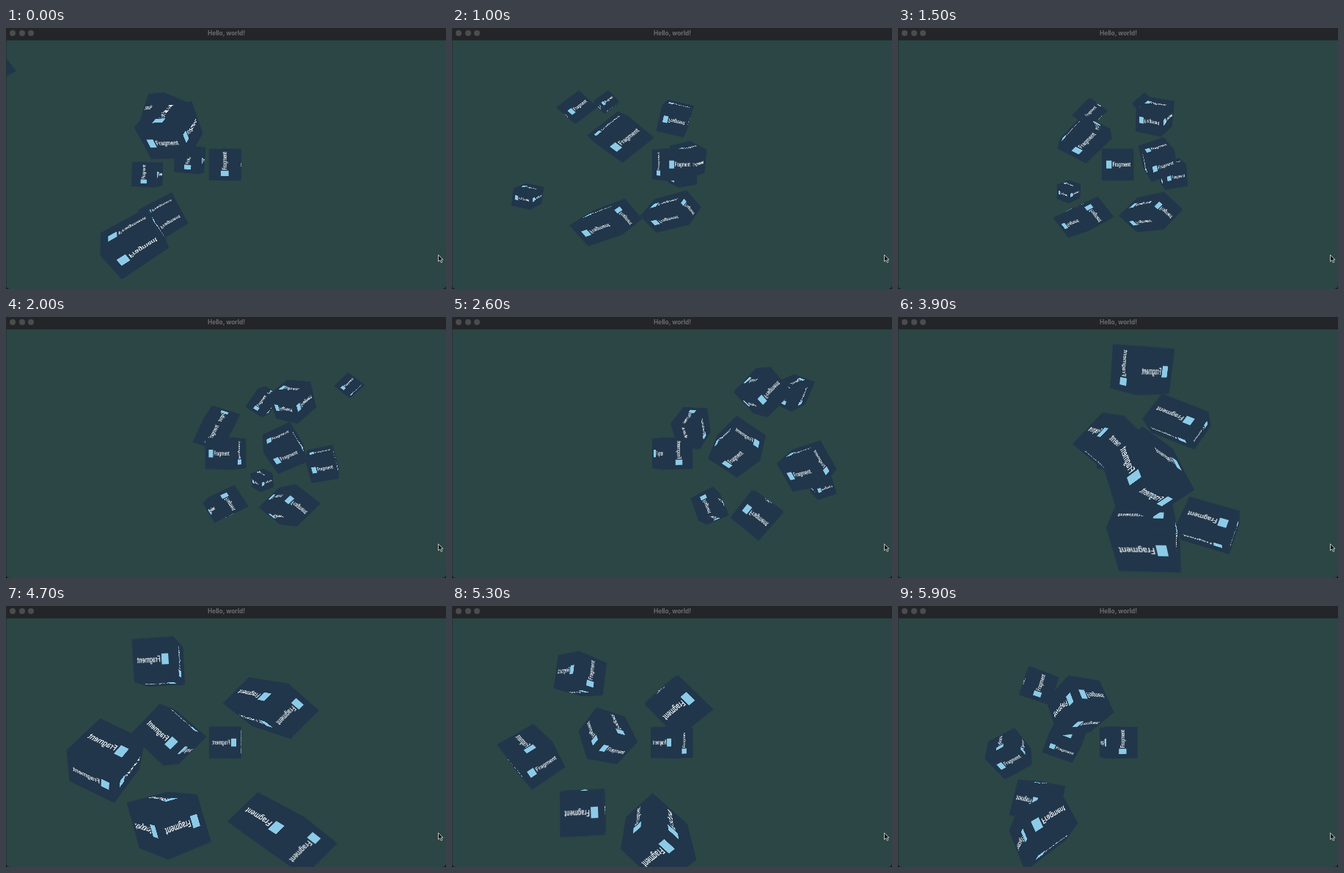
Recreate the animation shown at these times as an HTML page. Size 600x356 px, loop 6 s.

```html
<!DOCTYPE html>
<html lang="en">
<head>
<meta charset="utf-8">
<title>Hello, world!</title>
<style>
  html, body { margin: 0; width: 100%; height: 100%; overflow: hidden; background: #15191b; }
  #window { position: absolute; inset: 0; overflow: hidden; background: #2b4645; border-radius: 0 0 5px 5px; }
  #window::after { content: ""; position: absolute; z-index: 1; inset: 16px 0 0; border-left: 1px solid #223635; }
  #scene { position: absolute; inset: 0; z-index: 0; }
  #bar {
    position: absolute; z-index: 2; left: 0; top: 0; width: 100%; height: 16px; background: #242528;
    border-bottom: 1px solid #202a2b;
    font: bold 8.3px/15px Inter, sans-serif; text-align: center; color: #6c6d6f; text-indent: 1px;
  }
  #bar i { position: absolute; top: 3px; width: 8px; height: 8px; border-radius: 50%; background: #4b4c4e; }
  #pointer { position: absolute; z-index: 2; left: 588px; top: 308px; }
  .face {
    position: absolute; left: 0; top: 0; width: 72px; height: 48px; transform-origin: 0 0;
    background: #21364a; box-shadow: 0 0 0 .25px #21364a;
    font: 500 9.6px/47px Roboto, sans-serif; color: #f4f8fa; text-indent: 24px; white-space: nowrap;
  }
  .face::before { content: ""; position: absolute; left: 10px; top: 18px; width: 11.5px; height: 11.5px; background: #8ccbe8; }
</style>
</head>
<body>
<div id="window">
  <div id="scene"></div>
  <div id="bar"><i style="left:5px"></i><i style="left:17.5px"></i><i style="left:30px"></i>Hello, world!</div>
  <svg id="pointer" width="10" height="14"><path d="M1.5 1.5v9l2.2-1.9 1.6 3.4 1.6-.8-1.6-3.2h2.8z" fill="#111" stroke="#ccd2d2" stroke-width=".9"/></svg>
</div>
<script>
const LOOP = 6000, STEP = 100, START = 36.21;    // the scene clock is already running
const CX = 300, CY = 186.2, FOCAL = 410, RADIUS = 10;
const LABEL_W = 72, LABEL_H = 48;                // a wide label, mapped onto square faces
const AXIS = [1, 0.3, 0.5];                      // not unit length, so cubes stretch as they turn
const positions = [
  [0, 0, 0], [2, 5, -15], [-1.5, -2.2, -2.5], [-3.8, -2, -12.3], [2.4, -0.4, -3.5],
  [-1.7, 3, -7.5], [1.3, -2, -2.5], [1.5, 2, -2.5], [1.5, 0.2, -1.5], [-1.3, 1, -1.5]
];
// Per normal axis: the cube axes that texture u and v follow, and the sign of v
const layouts = [
  { u: 1, v: 2, flip: -1 },
  { u: 0, v: 2, flip: -1 },
  { u: 0, v: 1, flip: 1 }
];

const scene = document.getElementById("scene");
const cubes = positions.map(position => ({
  position,
  faces: [0, 1, 2].flatMap(axis => [-1, 1].map(side => {
    const el = document.createElement("div");
    el.className = "face";
    el.textContent = "Fragment";
    scene.append(el);
    return { el, axis, side };
  }))
}));

const det = ([a, b, c]) =>
  a[0] * (b[1] * c[2] - b[2] * c[1]) - a[1] * (b[0] * c[2] - b[2] * c[0]) + a[2] * (b[0] * c[1] - b[1] * c[0]);

// Columns of the axis-angle matrix
function turn(angle) {
  const c = Math.cos(angle), s = Math.sin(angle), [x, y, z] = AXIS, k = 1 - c;
  return [
    [c + k * x * x, k * x * y + s * z, k * x * z - s * y],
    [k * x * y - s * z, c + k * y * y, k * y * z + s * x],
    [k * x * z + s * y, k * y * z - s * x, c + k * z * z]
  ];
}

// Homogeneous screen column; the last entry is depth
const column = ([x, y, d], scale) =>
  [CX * d + FOCAL * x, CY * d - FOCAL * y, 0, d].map(n => (n * scale).toFixed(6));

function draw(time) {
  const sin = Math.sin(time), cos = Math.cos(time);
  const toView = ([x, y, z]) => [x * cos - z * sin, y, -x * sin - z * cos];

  cubes.forEach(({ position, faces }, i) => {
    const center = toView(position);
    center[2] += RADIUS;
    const axes = turn(i * 2.5 * time * Math.PI / 180).map(toView);
    const volume = det(axes), toEye = center.map(n => -n);
    const eye = axes.map((_, n) => det(axes.map((a, m) => m === n ? toEye : a)) / volume);

    for (const { el, axis, side } of faces) {
      const visible = center[2] > 2 && side * eye[axis] > 0.5;
      el.style.display = visible ? "" : "none";
      if (!visible) continue;
      const { u, v, flip } = layouts[axis];
      const right = axes[u], up = axes[v].map(n => n * flip);
      const corner = center.map((n, k) => n + (side * axes[axis][k] - right[k] + up[k]) / 2);
      el.style.zIndex = Math.round(10000 - 100 * center[2]);
      el.style.transform = `matrix3d(${[
        ...column(right, 1 / LABEL_W), ...column(up, -1 / LABEL_H), 0, 0, 1, 0, ...column(corner, 1)
      ]})`;
    }
  });
}

function tick() {
  const elapsed = performance.now() % LOOP;
  draw(START + Math.floor(elapsed / STEP) * STEP / 1000);
  requestAnimationFrame(tick);
}
tick();
</script>
</body>
</html>
```
